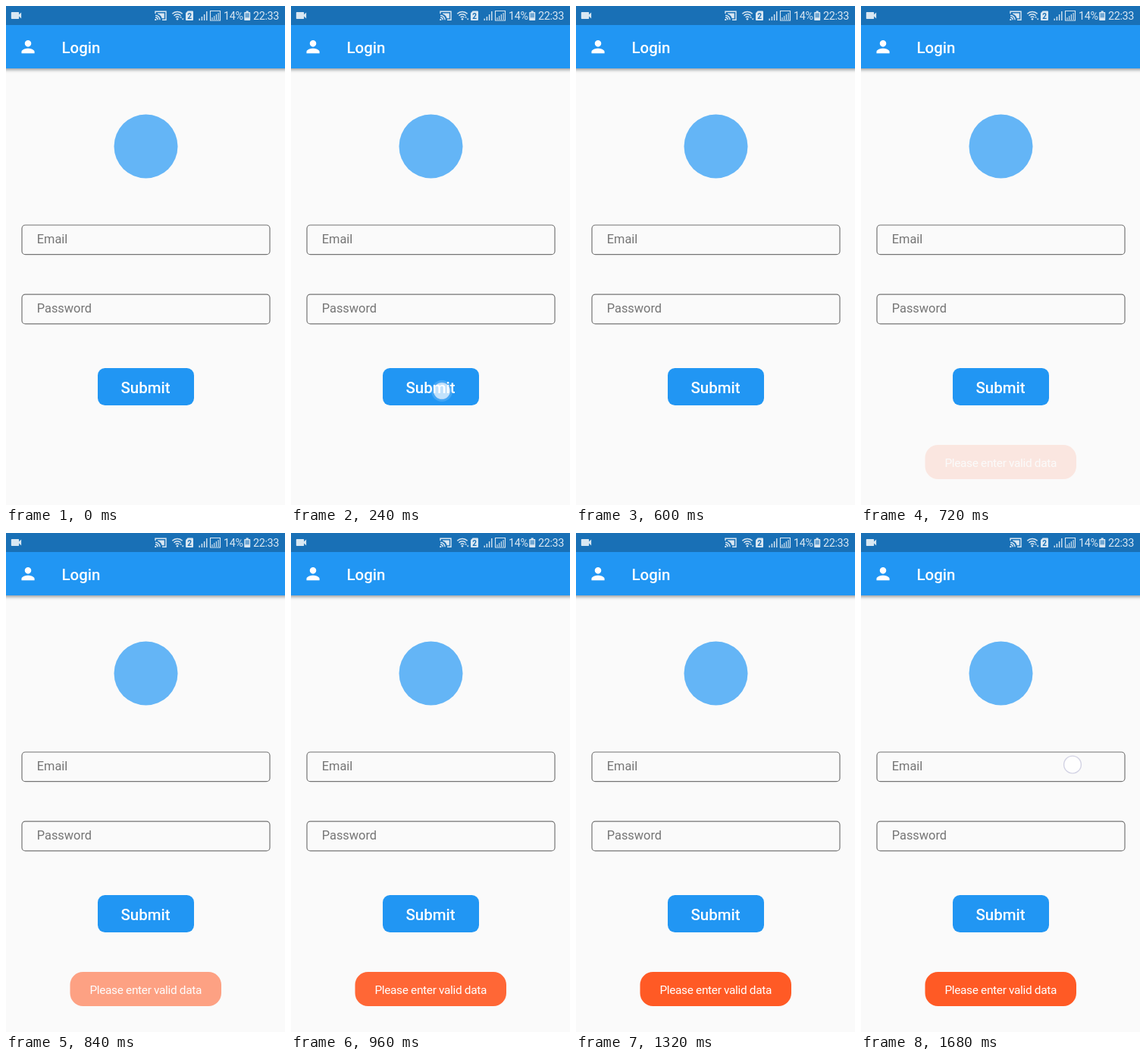
Recreate the animation shown at these times as an HTML page. Size 368 px wide and 656 px high, loop 1.8 s.

```html
<!DOCTYPE html>
<html lang="en">
<head>
<meta charset="utf-8">
<title>Login</title>
<style>
  html, body { margin: 0; width: 100%; height: 100%; overflow: hidden; background: #fafafa; }
  svg { display: block; width: 368px; height: 656px; font-family: Roboto, sans-serif; }
  .bar { fill: #2196f3; filter: drop-shadow(0 2px 2px rgba(0, 0, 0, .38)); }
  .title { font-size: 20.44px; font-weight: 500; fill: #fff; }
  .hint { font-size: 16.36px; fill: #757575; }
  .field { fill: none; stroke: #757575; stroke-width: 1.2; }
  .status { fill: #d9e7f2; stroke: none; }
  .status text { font-size: 14.4px; letter-spacing: -.4px; }
  .line { fill: none; stroke: #d9e7f2; stroke-width: 1.4; }
  .message { font-size: 15.4px; letter-spacing: -.32px; fill: #fff; }
  .middle { text-anchor: middle; }

  .toast, .press, .tap, .ripple { opacity: 0; animation: 1800ms step-end infinite; }
  .toast { animation-name: toast; }
  .press { animation-name: press; }
  .tap { animation-name: tap; }
  .ripple { animation-name: ripple; transform-origin: 199px 506px; }

  @keyframes toast {
    0% { opacity: 0; }
    39.99% { opacity: .12; }
    46.66% { opacity: .56; }
    53.33% { opacity: .92; }
    59.99%, 100% { opacity: 1; }
  }
  @keyframes press {
    0% { opacity: 0; }
    6.66% { opacity: .6; }
    13.33% { opacity: 1; }
    26.66% { opacity: .4; }
    33.33%, 100% { opacity: 0; }
  }
  @keyframes ripple {
    0% { opacity: 0; }
    13.33% { opacity: .16; transform: scale(1); }
    19.99% { opacity: .12; transform: scale(1.14); }
    26.66%, 100% { opacity: 0; }
  }
  @keyframes tap {
    0% { opacity: 0; }
    93.33%, 100% { opacity: 1; }
  }
</style>
</head>
<body>
<svg viewBox="0 0 368 656">
  <rect width="368" height="656" fill="#fafafa"/>
  <rect class="bar" x="-10" width="388" height="82"/>
  <rect width="368" height="25" fill="#1970b6"/>

  <g class="status">
    <path transform="translate(4.6 3.6) scale(.74)" d="M17 10.5V7c0-.55-.45-1-1-1H4c-.55 0-1 .45-1 1v10c0 .55.45 1 1 1h12c.55 0 1-.45 1-1v-3.5l4 4v-11l-4 4z"/>

    <!-- cast -->
    <path class="line" d="M197 10V7.2H211V18.3H206M197 12.3a6 6 0 0 1 6 6M197 15a3.3 3.3 0 0 1 3.3 3.3"/>
    <path d="M200 9.4h8.8v6.8h-3.2a8 8 0 0 0-5.6-5.6zM196.3 17h2v2h-2z"/>

    <!-- wi-fi -->
    <path class="line" d="M219.3 10.3a9.3 9.3 0 0 1 13.4 0M221.5 12.7a6.2 6.2 0 0 1 9 0M223.7 15a3.2 3.2 0 0 1 4.6 0"/>
    <circle cx="226" cy="17.3" r="1.3"/>
    <path d="M229 15.6l1.6-2.2 1.6 2.2zM231.6 16.4h3.2l-1.6 2.2z"/>

    <path d="M239.7 6.5h6.3q1 0 1 1v10.5q0 1-1 1h-8q-1 0-1-1v-8.7z"/>
    <text x="242" y="16.8" class="middle" style="font-size:10px;font-weight:700;letter-spacing:0;fill:#1970b6">2</text>

    <!-- signal strength -->
    <path class="line" d="M255.2 19v-2.5M258.4 19v-5M261.6 19v-8M264.8 19V7"/>
    <path class="line" style="stroke-width:1.1" d="M269.5 6.5h13v12.5h-13zM272 18v-3M274.7 18v-5M277.4 18v-7M280.1 18V9"/>

    <text x="287" y="18">14%</text>
    <path d="M316.7 6.5h3v1.5h1.8q.7 0 .7.7v9.6q0 .7-.7.7h-6.6q-.7 0-.7-.7V8.7q0-.7.7-.7h1.8z"/>
    <path fill="#1970b6" opacity=".55" d="M315.5 9.3h5.4v6h-5.4z"/>
    <text x="326" y="18">22:33</text>
  </g>

  <path fill="#fff" transform="translate(16.2 40.8) scale(1.07)" d="M12 12c2.21 0 4-1.79 4-4s-1.79-4-4-4-4 1.79-4 4 1.79 4 4 4zm0 2c-2.67 0-8 1.34-8 4v2h16v-2c0-2.66-5.33-4-8-4z"/>
  <text class="title" x="73.5" y="61.5">Login</text>

  <circle cx="184.5" cy="184.5" r="42" fill="#64b5f6"/>

  <rect class="field" x="21" y="288" width="327" height="38.7" rx="4.5"/>
  <text class="hint" x="40.8" y="312">Email</text>
  <rect class="field" x="21" y="379.2" width="327" height="38.7" rx="4.5"/>
  <text class="hint" x="40.8" y="403">Password</text>

  <rect x="121" y="476" width="127" height="49" rx="9.5" fill="#2196f3"/>
  <circle class="ripple" cx="199" cy="506" r="14" fill="#fff"/>
  <text class="title middle" x="184" y="508.7">Submit</text>

  <g class="toast">
    <rect x="84.5" y="577" width="199.5" height="45" rx="17" fill="#ff5a25"/>
    <text class="message middle" x="184.2" y="606">Please enter valid data</text>
  </g>

  <circle class="press" cx="199" cy="506" r="10.8" fill="#fff" fill-opacity=".68" stroke="#c9d3ee" stroke-opacity=".4"/>
  <circle class="tap" cx="279" cy="304.5" r="11.4" fill="#fff" fill-opacity=".68" stroke="#d3d3e4" stroke-width="1.4"/>
</svg>
</body>
</html>
```
